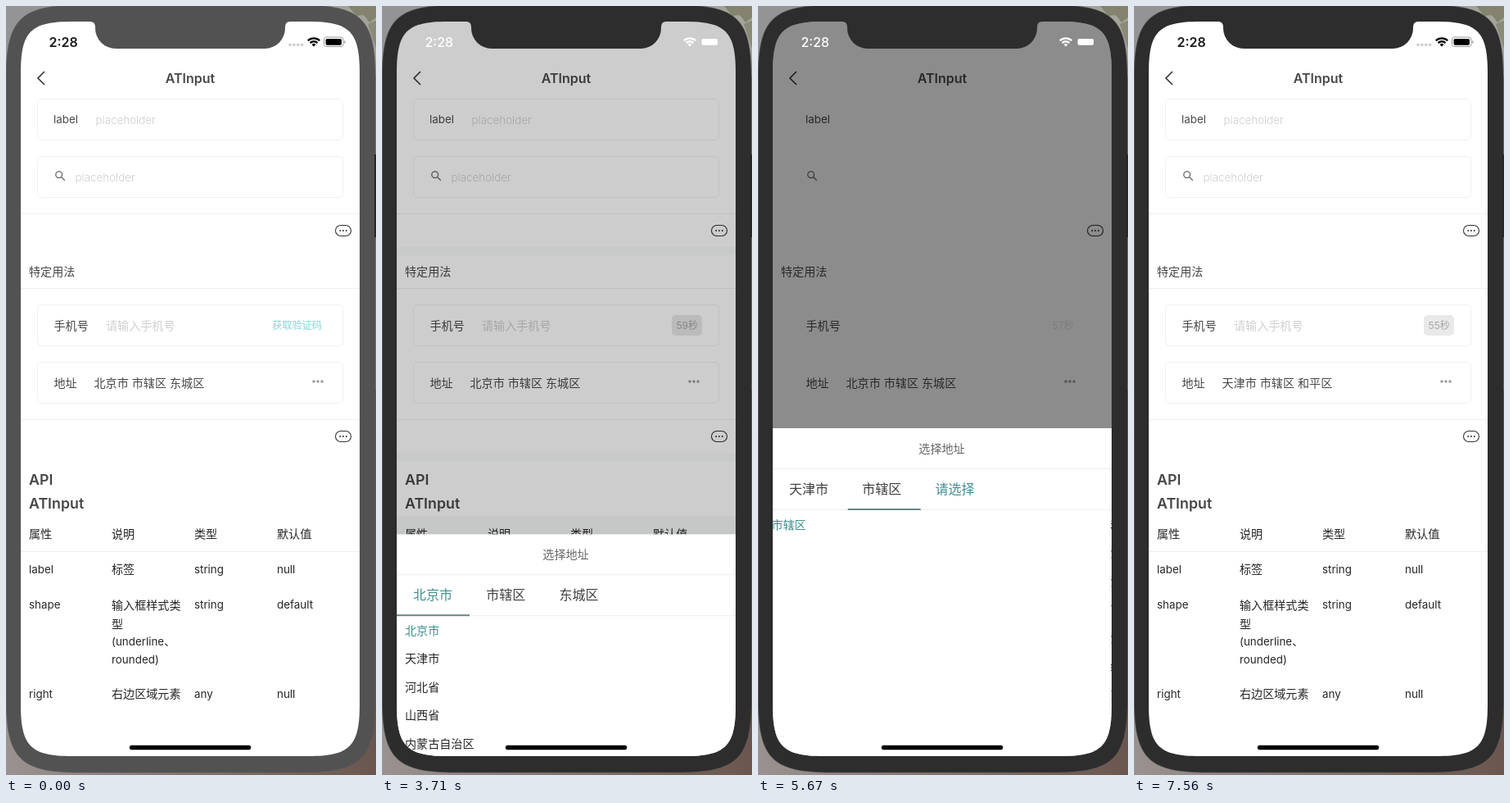
Recreate the animation shown at these times as an HTML page. Size 452 by 938 pixels, loop 8190 ms.

```html
<!DOCTYPE html>
<html lang="zh-CN">
<head>
<meta charset="utf-8">
<title>ATInput</title>
<style>
html, body { margin: 0; width: 100%; height: 100%; overflow: hidden; }
svg { display: block; width: 452px; height: 938px; font: 14.1px Inter, "Noto Sans CJK SC", sans-serif; }
text { fill: #484848; white-space: pre; }
.en { font-size: 13.4px; }
.cell, .row { fill: #262626; }
.hint { fill: #cfcfcf; font-weight: 300; }
.rule { stroke: #eee; }
.box { fill: none; stroke: #f0f0f0; }
.tab { font-size: 16px; fill: #404040; }
.mid { text-anchor: middle; }
</style>
</head>
<body>
<svg id="stage" viewBox="0 0 452 938"></svg>
<script>
const LOOP = 8190, STEP = 70;
const TEAL = '#418f8f';
const SHEET_TOP = 515, SHEET_H = 400, PAGE_W = 414, TAB_W = 89.2;

const label = (x, y, s, attrs = '') => `<text x="${x}" y="${y}" ${attrs}>${s}</text>`;
const rect = (x, y, w, h, attrs = '') => `<rect x="${x}" y="${y}" width="${w}" height="${h}" ${attrs}/>`;
const rule = y => `<path class="rule" d="M18 ${y}h414"/>`;
const box = y => rect(38.5, y + .5, 373, 50, 'rx="5" class="box"');
const dots = (x, y, gap, r, n = 3) =>
  Array.from({ length: n }, (_, i) => `<circle cx="${x + i * gap}" cy="${y}" r="${r}"/>`).join('');
const bubble = y => rect(402.5, y - 6.5, 19, 13, 'rx="6.5" fill="none" stroke="#333" stroke-width="1.1"') +
  `<g fill="#333">${dots(408.2, y, 3.8, 1)}</g>`;
const cells = (y, ...list) => list.map((s, i) =>
  label(28 + i * 101, y, s, `class="cell${/^[\x00-\x7f]/.test(s) ? ' en' : ''}"`)).join('');
const rows = (page, names) => names.split(' ').map((s, i) =>
  label(28 + page * PAGE_W, 122.7 + i * 34.5, s, `id="row${page}${i}" class="row"`)).join('');

// Rectangle whose corners curve continuously, about radius r at the diagonal
function squircle(x, y, w, h, r, attrs = '') {
  const e = 1.5 * r, c = e * .81;
  return `<path d="M${x + e} ${y}h${w - 2 * e}c${c} 0 ${e} ${e - c} ${e} ${e}` +
    `v${h - 2 * e}c0 ${c} ${c - e} ${e} ${-e} ${e}` +
    `h${2 * e - w}c${-c} 0 ${-e} ${c - e} ${-e} ${-e}` +
    `v${2 * e - h}c0 ${-c} ${e - c} ${-e} ${e} ${-e}z" ${attrs}/>`;
}

const wallpaper = `
  ${rect(0, 0, 226, 469, 'fill="#949496"')}
  ${rect(226, 0, 226, 469, 'fill="#a4a49b"')}
  ${rect(0, 469, 452, 469, 'fill="url(#floor)"')}
  <path d="M418 0h34v14l-8 6-7-9-9 1z" fill="#83836f"/>
  <path d="M442 22l10-4v34z" fill="#8a8a78"/>`;

const page = `
  ${rect(18, 19, 414, 896, 'fill="#fff"')}
  <g id="faint">
    ${rect(18, 294, 414, 10, 'fill="#f8fbfa"')}${rect(18, 545, 414, 10, 'fill="#f8fbfa"')}
    ${rect(18, 622, 414, 43, 'fill="#f6f9f8"')}
    ${rect(331, 677, 23, 20, 'fill="#f5f5f5"')}${rect(331, 720, 45, 20, 'fill="#f5f5f5"')}
    ${rect(331, 829, 23, 20, 'fill="#f5f5f5"')}
    ${rule(708.5)}${rule(818.5)}${rule(861.5)}
  </g>
  <g id="lines">
    ${[113, 183, 364, 434].map(box).join('')}
    ${[253.5, 344.5, 504.5, 665.5].map(rule).join('')}
  </g>
  <path d="M47 80l-8 8 8 8" fill="none" stroke="#333" stroke-width="1.6"/>
  ${label(225, 93.8, 'ATInput', 'class="mid" font-size="16" font-weight="600"')}
  ${label(58, 143, 'label', 'class="en"')}
  <g fill="none" stroke="#666" stroke-width="1.3">
    <circle cx="64.7" cy="205.7" r="3.9"/><path d="M67.5 208.5l4.3 4.3"/>
  </g>
  <g id="hints">
    ${label(109.5, 143.5, 'placeholder', 'class="hint en"')}
    ${label(84.5, 213.5, 'placeholder', 'class="hint en"')}
    ${label(122, 394.8, '请输入手机号', 'class="hint"')}
  </g>
  ${bubble(274)}
  ${label(28, 328.7, '特定用法')}
  ${label(58.5, 394.8, '手机号')}
  ${label(386, 393.8, '获取验证码', 'id="send" text-anchor="end" font-size="12.2" style="fill:#82d5d6"')}
  <g id="timer">
    ${rect(354, 377, 37, 25, 'id="pill" rx="5" fill="#e9e9e9"')}
    ${label(372.7, 393.7, '', 'id="count" class="mid" font-size="12" style="fill:#a6a6a6"')}
  </g>
  ${label(58.5, 464.8, '地址')}
  ${label(107.5, 464.8, '', 'id="address"')}
  <g fill="#999">${dots(376, 458, 5, 1.7)}</g>
  ${bubble(525)}
  ${label(28, 584, 'API', 'font-size="17.8" font-weight="600"')}
  ${label(28, 613, 'ATInput', 'font-size="17.8" font-weight="600"')}
  ${cells(649, '属性', '说明', '类型', '默认值')}
  ${cells(691.7, 'label', '标签', 'string', 'null')}
  ${cells(734.7, 'shape', '', 'string', 'default')}
  ${cells(736, '', '输入框样式类')}${cells(758.5, '', '型')}
  ${cells(779.7, '', '(underline、')}${cells(801.5, '', 'rounded)')}
  ${cells(844, 'right', '右边区域元素', 'any', 'null')}`;

const sheet = `
  <g id="sheet" clip-path="url(#sheetClip)">
    ${rect(18, 0, 414, SHEET_H, 'fill="#fff"')}
    ${label(224.5, 29.7, '选择地址', 'class="mid" style="fill:#666"')}
    ${rule(49.5)}${rule(99.5)}
    ${[0, 1, 2].map(i => label(38 + i * TAB_W, 80.3, '', `id="tab${i}" class="tab"`)).join('')}
    ${rect(18, 98, 89, 2, 'id="bar" fill="#658987"')}
    <g id="pages">
      ${rows(0, '北京市 天津市 河北省 山西省 内蒙古自治区 辽宁省 吉林省 黑龙江省 上海市')}
      ${rows(1, '市辖区')}
      ${rows(2, '和平区 河东区 河西区 南开区 河北区 红桥区 东丽区 西青区 津南区')}
    </g>
  </g>`;

const status = `
  <g id="status">
    ${label(52.5, 49.7, '2:28', 'id="clock" font-size="16"')}
    <g id="signal" fill="#d0d0d0">${dots(347, 47.3, 4.9, 1.9, 4)}</g>
    <path d="M368.8 42.3a10.2 10.2 0 0 1 14.4 0M371.6 45.1a6.2 6.2 0 0 1 8.8 0"
      fill="none" stroke="currentColor" stroke-width="2.3"/>
    <path d="M373.6 47a3.4 3.4 0 0 1 4.8 0l-2.4 2.5z" fill="currentColor"/>
    <g id="shell">
      ${rect(388.5, 38, 23.5, 11.5, 'rx="3" fill="none" stroke="#999"')}
      <path d="M413.4 42v4q1.4-.6 1.4-2t-1.4-2" fill="#999"/>
    </g>
    ${rect(390.5, 40, 19.5, 7.8, 'rx="1.8" fill="currentColor"')}
  </g>`;

document.getElementById('stage').innerHTML = `
  <defs>
    <clipPath id="screen">${squircle(18, 19, 414, 896, 42)}</clipPath>
    <clipPath id="sheetClip">${rect(18, 0, 414, SHEET_H)}</clipPath>
    <linearGradient id="floor">
      <stop stop-color="#9a9290"/><stop offset="1" stop-color="#6a564e"/>
    </linearGradient>
  </defs>
  ${wallpaper}
  <g id="bezel">${squircle(.2, -1, 451.3, 936, 60, 'stroke="#5c5c5c" stroke-width=".5"')}</g>
  ${rect(450, 181, 2, 101, 'fill="#262626"')}
  <g clip-path="url(#screen)">
    ${page}
    ${rect(18, 19, 414, 896, 'id="dim"')}
    ${sheet}
    ${status}
  </g>
  <path id="notch" d="M103 18v1q6 0 6 7v1a25 25 0 0 0 25 25h182a25 25 0 0 0 25-25v-1q0-7 6-7v-1z"/>
  ${rect(150.8, 901.8, 148.4, 5.4, 'rx="2.7"')}`;

const $ = id => document.getElementById(id);
const show = (id, on) => $(id).setAttribute('opacity', +on);
const text = (id, s) => { $(id).textContent = s; };
const tint = (id, on) => { $(id).style.fill = on ? TEAL : ''; };
const clamp = v => Math.min(1, Math.max(0, v));
const progress = (t, start, length) => clamp((t - start) / length);
const ease = p => (1 - Math.cos(Math.PI * p)) / 2;

// Damped spring from 0 to 1: stiffness 230, damping 22, mass 1
function spring(ms) {
  const s = Math.max(0, ms) / 1000, w = 10.45;
  return 1 - Math.exp(-11 * s) * (Math.cos(w * s) + 11 / w * Math.sin(w * s));
}

function draw(t) {
  const open = t >= 3640 && t < 6790;
  const modal = t >= 3640 && t < 6930;
  const dim = .45 * (t < 6650 ? progress(t, 3585, 287) : 1 - progress(t, 6650, 195));
  const washed = dim > .3;
  const flat = t >= 3990 && t < 6720;

  const shell = t < 910 ? '#525252' : t < 980 ? '#404040' : '#2d2d2d';
  $('bezel').setAttribute('fill', shell);
  $('notch').setAttribute('fill', shell);

  show('faint', dim > 0 && !washed);
  show('lines', !washed);
  show('hints', !flat);
  show('send', t < 2240);
  show('timer', t >= 2240);
  show('pill', !washed);
  show('count', flat ? .35 : 1);
  text('count', 60 - Math.floor((t - 2240 + 14) / 1064) + '秒');
  text('address', t < 6720 ? '北京市 市辖区 东城区' : '天津市 市辖区 和平区');
  $('dim').setAttribute('opacity', dim);

  $('status').style.color = modal ? '#fff' : '#000';
  $('clock').style.fill = modal ? '#fff' : '#1a1a1a';
  $('clock').style.fontWeight = modal ? 500 : 600;
  show('signal', !modal);
  show('shell', !modal);

  show('sheet', open);
  const rise = spring(t - 3585) - progress(t, 6650, 130) ** 2;
  $('sheet').setAttribute('transform', `translate(0 ${SHEET_TOP + SHEET_H * (1 - rise)})`);

  const level = t < 4690 ? 0 : t < 5460 ? 1 : 2;
  const tabs = ['北京市 市辖区 东城区', '天津市 请选择', '天津市 市辖区 请选择'][level].split(' ');
  for (let i = 0; i < 3; i++) {
    text('tab' + i, tabs[i] || '');
    tint('tab' + i, i === level);
    $('tab' + i).style.fontWeight = i === level ? 500 : 400;
  }
  tint('row00', level === 0);
  tint('row01', level > 0);
  tint('row10', level === 2);
  const slide = ease(progress(t, 4645, 420)) + ease(progress(t, 5625, 420));
  $('pages').setAttribute('transform', `translate(${-PAGE_W * slide} 0)`);
  $('bar').setAttribute('x', 18 + TAB_W * slide);
}

const start = performance.now();
function tick(now) {
  const t = Math.max(0, now - start) % LOOP;
  draw(Math.floor(t / STEP) * STEP);
  requestAnimationFrame(tick);
}
draw(0);
requestAnimationFrame(tick);
</script>
</body>
</html>
```
